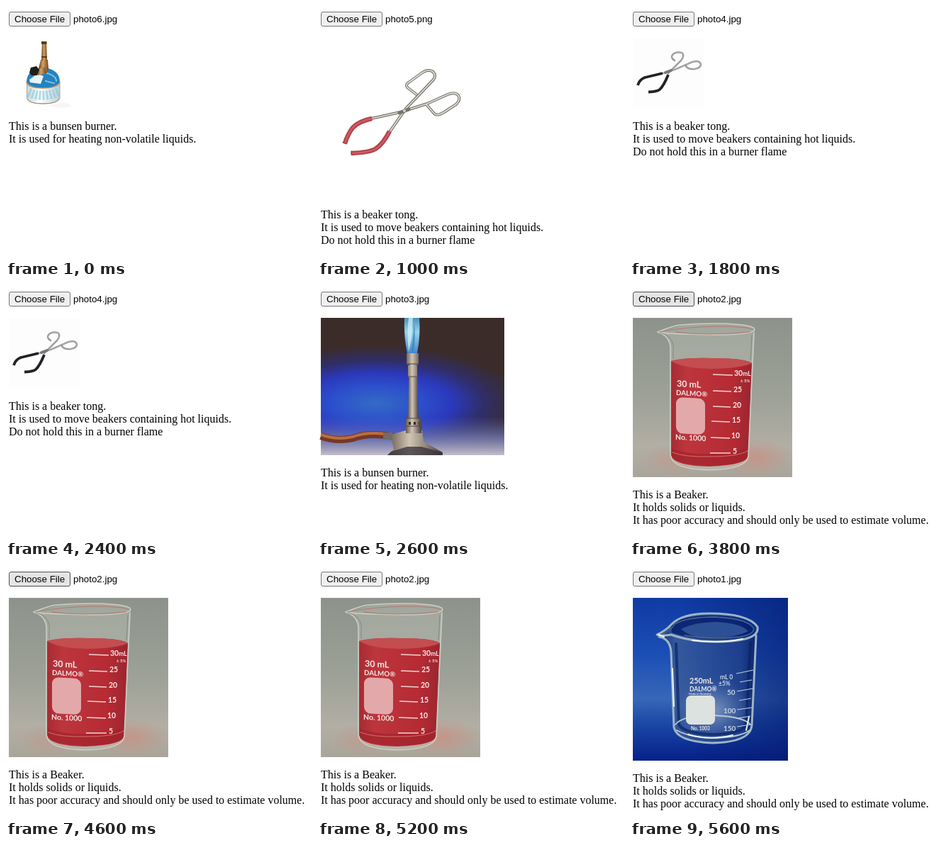
Recreate the animation shown at these times as an HTML page. Size 432 px wide and 356 px high, loop 7.4 s.

```html
<!DOCTYPE html>
<html lang="en">
<head>
<meta charset="utf-8">
<title>Lab equipment classifier</title>
<style>
  html, body { margin: 0; width: 100%; height: 100%; overflow: hidden; background: #fff; color: #000; }
  svg, #button, #file, #caption { position: absolute; left: 4px; top: 0; white-space: pre; }
  svg { left: 0; }
  #button, #file { top: 8px; font: 13.3333px "Liberation Sans", Arial, sans-serif; }
  #button { box-sizing: border-box; width: 87px; height: 21px; padding: 2px 7px; border: 1px solid #767676; border-radius: 3px; background: #efefef; }
  #button.hover { border-color: #4f4f4f; background: #e5e5e5; }
  #file { left: 95px; padding-top: 3px; }
  #caption { font: 16px "Liberation Serif", "Times New Roman", serif; }
  .scene { display: none; }
  .scene.on { display: inline; }
  .line { fill: none; stroke-linecap: round; stroke-linejoin: round; }
  .print { font-family: Lato, "Open Sans", sans-serif; font-weight: bold; fill: #f6e9e8; }
</style>
</head>
<body>
<div id="button">Choose File</div>
<div id="file"></div>
<svg width="432" height="356" viewBox="0 0 432 356">
  <defs>
    <linearGradient id="brass"><stop stop-color="#694019"/><stop offset=".45" stop-color="#d2a164"/><stop offset="1" stop-color="#70451d"/></linearGradient>
    <linearGradient id="steel"><stop stop-color="#64594f"/><stop offset=".4" stop-color="#d0c5b4"/><stop offset=".65" stop-color="#9c8f83"/><stop offset="1" stop-color="#483d3c"/></linearGradient>
    <linearGradient id="can"><stop stop-color="#c9d7da"/><stop offset=".4" stop-color="#fff"/><stop offset="1" stop-color="#b9ced5"/></linearGradient>
    <radialGradient id="glow" gradientUnits="userSpaceOnUse" cx="0" cy="0" r="1" gradientTransform="translate(82 166) scale(205 82)">
      <stop stop-color="#346bc4"/><stop offset=".3" stop-color="#2c50cc"/><stop offset=".52" stop-color="#2b39bd"/><stop offset=".74" stop-color="#302e68"/><stop offset="1" stop-color="#3b2c29"/>
    </radialGradient>
    <linearGradient id="bench" x2="0" y2="1"><stop stop-color="#5364bf" stop-opacity="0"/><stop offset=".55" stop-color="#7880bb" stop-opacity=".75"/><stop offset="1" stop-color="#c5bfca"/></linearGradient>
    <linearGradient id="flame" x2="0" y2="1"><stop stop-color="#4a91bf"/><stop offset=".4" stop-color="#99d5e9"/><stop offset="1" stop-color="#4387cc"/></linearGradient>
    <linearGradient id="wall" x2="0" y2="1"><stop stop-color="#8d938b"/><stop offset=".5" stop-color="#9da197"/><stop offset=".8" stop-color="#b2aea4"/><stop offset="1" stop-color="#aaa59a"/></linearGradient>
    <linearGradient id="liquid"><stop stop-color="#a92b33"/><stop offset=".2" stop-color="#bd363d"/><stop offset=".75" stop-color="#b62a33"/><stop offset="1" stop-color="#9a2630"/></linearGradient>
    <radialGradient id="blush"><stop stop-color="#cf8a7c" stop-opacity=".65"/><stop offset="1" stop-color="#cf8a7c" stop-opacity="0"/></radialGradient>
    <linearGradient id="blue" x2="0" y2="1"><stop stop-color="#0f3aa4"/><stop offset=".35" stop-color="#1b4fb6"/><stop offset=".62" stop-color="#3767b8"/><stop offset=".78" stop-color="#1a46a6"/><stop offset="1" stop-color="#06208a"/></linearGradient>
    <linearGradient id="dusk"><stop offset=".3" stop-color="#041a6c" stop-opacity="0"/><stop offset="1" stop-color="#041a6c" stop-opacity=".6"/></linearGradient>
    <linearGradient id="glass"><stop stop-color="#0b2467"/><stop offset=".18" stop-color="#3c5c97"/><stop offset=".5" stop-color="#2c4f95"/><stop offset=".85" stop-color="#203f88"/><stop offset="1" stop-color="#0a2163"/></linearGradient>
    <radialGradient id="shine"><stop stop-color="#bccbdc" stop-opacity=".85"/><stop offset="1" stop-color="#8ca9d2" stop-opacity="0"/></radialGradient>
  </defs>

  <!-- Gas canister burner -->
  <g class="scene">
    <path d="M70 138Q84 134 92 141Q78 147 62 141Z" fill="#f6f5f4"/>
    <path d="M29.500 108V130Q31 138 52 138Q74 138 76 130V108Z" fill="url(#can)" stroke="#a6a7a3"/>
    <path d="M32 122Q52 131 74 121" class="line" stroke="#88c8df" stroke-width="13" stroke-dasharray="3 2" style="stroke-linecap:butt" opacity=".65"/>
    <path d="M30 131Q32 138 52 138Q73 138 75 131" class="line" stroke="#a58b68"/>
    <path d="M29 108Q29 91 48 88H59Q76 92 76 108Q68 116 52 116Q36 116 29 108Z" fill="#2482bf"/>
    <path d="M33 104L44 96L53 99L49 110L34 108Z" fill="#e9f3f5"/>
    <path d="M58 95Q71 99 71 106M56 106L68 109" class="line" stroke="#87c7e4" stroke-width="2" stroke-dasharray="2 2"/>
    <path d="M29 108Q32 116 52 116Q72 116 76 108" class="line" stroke="#c28a55" stroke-width="1.500"/>
    <path d="M49 76H59L60 89L57 96H49L46 88Z" fill="url(#brass)"/>
    <path d="M51 50H57L58 77H50Z" fill="url(#brass)"/>
    <path d="M50 50H57.500V54H50ZM50 71H58V73H50Z" fill="#5d3c1c"/>
    <path d="M43 90L55 86L57 95L45 98Z" fill="url(#brass)"/>
    <path d="M35 87L43 85L47 90L44 98L36 98L33 94Z" fill="#211d1a"/>
  </g>

  <!-- Red handled tongs -->
  <g class="scene">
    <g class="line">
      <g stroke="#77746c" stroke-width="4">
        <path id="upperArm" d="M139 125L126 115Q123 111 128 108L146 95Q154 89 161 92Q168 97 163 104L124 145L101 178"/>
        <path id="lowerArm" d="M153 139L164 152Q168 156 178 150L195 139Q202 132 198 126Q193 121 183 125L154 138L116 150L75 159"/>
      </g>
      <g stroke="#e3e1da" stroke-width="1.700"><use href="#upperArm"/><use href="#lowerArm"/></g>
      <path d="M115 151L128 146" stroke="#77746c" stroke-width="5"/>
      <circle cx="122" cy="148" r="2" fill="#d6d3ca"/>
      <g stroke="#b5434b" stroke-width="6.500" style="stroke-linecap:butt">
        <path id="gripA" d="M76 159Q57 163 49 172Q42 181 38 194"/>
        <path id="gripB" d="M101 177Q92 195 81 202Q72 207 47 208"/>
      </g>
      <g stroke="#d3656b" stroke-width="2" stroke-dasharray="1 2"><use href="#gripA"/><use href="#gripB"/></g>
      <path d="M35 193L40 195M47 205V210" stroke="#772f34"/>
    </g>
  </g>

  <!-- Black handled tongs -->
  <g class="scene">
    <path d="M4 45H104V145H4Z" fill="#fcfdfc"/>
    <g class="line">
      <g stroke="#777" stroke-width="2.200">
        <path id="smallUpper" d="M63 77Q57 73 60 69Q65 64 73 66Q78 70 72 77L54 95"/>
        <path id="smallLower" d="M79 85Q83 90 91 89Q99 88 100 83Q99 76 88 79L63 90L46 95"/>
      </g>
      <g stroke="#d5d5d5" stroke-width=".8"><use href="#smallUpper"/><use href="#smallLower"/></g>
      <path d="M50 94L58 91" stroke="#777" stroke-width="4"/>
      <path d="M46 95L21 101Q13 104 11 112M54 97Q48 112 42 118Q38 121 26 121.500" stroke="#222126" stroke-width="3.800" style="stroke-linecap:butt"/>
    </g>
  </g>

  <!-- Lit burner -->
  <g class="scene">
    <path d="M4 45H263V239H4Z" fill="url(#glow)"/>
    <path d="M4 184H263V239H4Z" fill="url(#bench)"/>
    <path d="M122 45H143Q145 68 140 95H126Q121 72 122 45Z" fill="url(#flame)"/>
    <path d="M128 45H134L132 75L128 93Q125 66 128 45Z" fill="#d9f4f9" opacity=".7"/>
    <path d="M136 51Q138 72 135 91L132 94Z" fill="#367fb8" opacity=".7"/>
    <path d="M4 212Q26 220 49 215Q72 206 108 213" class="line" stroke="#753826" stroke-width="10" style="stroke-linecap:butt"/>
    <path d="M4 210Q26 218 49 213Q72 204 108 211" class="line" stroke="#b96d42" stroke-width="4" style="stroke-linecap:butt"/>
    <path d="M92 207H105V217H92Z" fill="#756a68"/>
    <path d="M103 210L124 204H147L149 220L176 235V239H98L107 231Z" fill="url(#steel)"/>
    <path d="M103 234L126 227H146L175 235V239H98Z" fill="#363039" opacity=".75"/>
    <path d="M129 111H140L142 190H127Z" fill="url(#steel)"/>
    <path d="M125 95H142V111H125ZM127 112H140V129H127ZM124 187H146V208H124Z" fill="url(#steel)"/>
    <path d="M125 110H142M127 128H140M124 187H146M124 198H146" stroke="#4e4542"/>
    <path d="M128 194H143" stroke="#322c2c" stroke-width="4" stroke-dasharray="3 4"/>
  </g>

  <!-- Red liquid beaker -->
  <g class="scene">
    <path d="M4 45H229V270H4Z" fill="url(#wall)"/>
    <ellipse cx="176" cy="242" rx="53" ry="27" fill="url(#blush)"/>
    <ellipse cx="62" cy="246" rx="46" ry="22" fill="url(#blush)" opacity=".6"/>
    <path d="M39 65Q56 68 57 86V239Q59 259 112 260Q166 259 168 240L176 63Q174 53 118 54Q72 54 60 60Z" fill="#c7c8bd" opacity=".35"/>
    <path d="M58 106Q75 101 117 102Q162 102 172 109L167 240Q165 253 112 255Q61 254 58 239Z" fill="url(#liquid)"/>
    <path d="M58 106Q75 101 117 102Q162 102 172 109Q158 116 115 117Q73 116 58 106Z" fill="#c44d50"/>
    <path d="M59 229Q77 238 112 237Q153 237 167 227L166 242Q158 253 112 254Q64 253 59 239Z" fill="#a0232c" opacity=".65"/>
    <path d="M60 235Q77 242 112 241Q153 241 166 233" class="line" stroke="#d9706a"/>
    <g class="line" stroke="#cdd0c6" stroke-width="1.500">
      <path d="M39 65Q56 70 57 87V239Q59 259 112 260Q165 259 167 240L175 66"/>
      <path d="M39 65Q51 60 65 56Q84 53 125 53Q177 54 176 62Q172 69 122 69Q73 68 55 67Z"/>
    </g>
    <path d="M43 66Q58 70 61 83V103M172 69L170 104" class="line" stroke="#838980"/>
    <path d="M41 65Q75 58 123 57Q162 57 173 61M64 65Q106 71 169 65" class="line" stroke="#b3766d"/>
    <g class="print" transform="translate(65 157) skewY(3) translate(-65 -157)">
      <text x="66" y="142" font-size="12.500">30 mL</text>
      <text x="65" y="154" font-size="9.800">DALMO®</text>
      <rect x="65" y="157" width="41" height="51" rx="9" fill="#e3a9aa"/>
      <text x="64" y="217" font-size="10.500">No. 1000</text>
    </g>
    <g class="print" font-size="10.500">
      <text x="147" y="127">30<tspan font-size="8.500">mL</tspan></text>
      <text x="156" y="136" font-size="6">± 5%</text>
      <text x="146" y="150">25</text><text x="145" y="172">20</text>
      <text x="144" y="193">15</text><text x="143" y="215">10</text><text x="145" y="237">5</text>
    </g>
    <path d="M117 125L145 126M117 148L143 149M117 170L142 171M115 191L141 192M114 214L141 215M113 236L142 236" stroke="#f0d5d2" stroke-width="1.300"/>
  </g>

  <!-- Empty beaker -->
  <g class="scene">
    <path d="M4 45H223V275H4Z" fill="url(#blue)"/>
    <path d="M4 45H223V275H4Z" fill="url(#dusk)"/>
    <path d="M39 98Q56 102 58 121L62 229Q64 248 116 250Q171 248 172 225L178 94Q169 69 111 68Q67 69 57 83Z" fill="url(#glass)" opacity=".8"/>
    <ellipse cx="119" cy="204" rx="53" ry="44" fill="url(#shine)" opacity=".65"/>
    <path d="M58 82Q73 70 115 70Q162 71 175 85Q174 98 149 102Q92 107 59 94Z" fill="#08206f" opacity=".85"/>
    <path d="M72 89Q92 79 122 79Q157 81 167 92Q144 104 99 101Q81 98 72 89Z" fill="#365b9e" opacity=".8"/>
    <g class="line">
      <path d="M65 110L69 224Q75 236 116 238Q158 237 164 224L170 108" stroke="#0b2464" stroke-width="4" opacity=".7"/>
      <g stroke="#9eb5c4" stroke-width="3">
        <path d="M41 100Q56 102 58 121L62 228Q66 248 116 250Q170 249 172 225L178 98"/>
        <path d="M38 97Q51 91 58 83Q73 67 112 67Q167 67 180 86Q182 98 163 103Q137 109 99 106Q74 103 58 97Q48 99 38 97Z"/>
      </g>
      <path d="M41 98Q58 92 63 82Q81 72 119 72Q165 74 174 87Q178 96 155 100Q116 105 77 98" stroke="#4e6c8b" stroke-width="1.300"/>
      <path d="M64 224Q76 210 119 211Q161 213 170 224M66 232Q83 242 119 243Q156 242 169 232" stroke="#b8c9d7" stroke-width="1.800"/>
      <path d="M40 97L48 100M60 145L62 198M168 213L164 232M82 238Q111 247 145 239M88 105Q126 110 159 103" stroke="#eef4ef" stroke-width="2"/>
    </g>
    <g class="print" font-size="10">
      <text x="84" y="166" font-size="10.800">250mL</text>
      <text x="84" y="177" font-size="8.500">DALMO®</text>
      <text x="83" y="182" font-size="4">Made in Germany</text>
      <rect x="79" y="183" width="41" height="41" rx="7" fill="#dce2df"/>
      <text x="86" y="232" font-size="6.500">No. 1003</text>
      <g fill="#c8d7e4">
        <text x="127" y="160" font-size="8.500">mL 0</text><text x="125" y="169" font-size="8.500">±5%</text>
        <text x="137" y="182">50</text><text x="132" y="208">100</text><text x="132" y="233">150</text>
      </g>
    </g>
    <path d="M150 152L174 147M155 164L172 161M151 177L174 173M154 190L171 187M151 203L172 200M153 215L170 212M151 227L171 224" stroke="#bcd0df" stroke-width="1.200"/>
  </g>
</svg>
<div id="caption"></div>
<script>
  const LOOP = 7400, GAP = 16;
  const burner = "This is a bunsen burner.\nIt is used for heating non-volatile liquids.";
  const tong = "This is a beaker tong.\nIt is used to move beakers containing hot liquids.\nDo not hold this in a burner flame";
  const beaker = "This is a Beaker.\nIt holds solids or liquids.\nIt has poor accuracy and should only be used to estimate volume.";
  const slides = [
    { at: 0, file: "photo6.jpg", bottom: 145, text: burner },
    { at: 1000, file: "photo5.png", bottom: 270, text: tong },
    { at: 1800, file: "photo4.jpg", bottom: 145, text: tong },
    { at: 2600, file: "photo3.jpg", bottom: 239, text: burner },
    { at: 3400, file: "photo2.jpg", bottom: 270, text: beaker },
    { at: 5600, file: "photo1.jpg", bottom: 275, text: beaker }
  ];
  const $ = id => document.getElementById(id);
  const scenes = document.querySelectorAll(".scene");
  let shown = -1;

  function show(index) {
    const { file, bottom, text } = slides[index];
    scenes.forEach((scene, i) => scene.classList.toggle("on", i === index));
    $("file").textContent = file;
    $("caption").textContent = text;
    $("caption").style.top = bottom + GAP + "px";
    shown = index;
  }

  function draw() {
    const t = performance.now() % LOOP;
    const index = slides.findLastIndex(slide => t >= slide.at);
    if (index !== shown) show(index);
    $("button").classList.toggle("hover", t >= 3800 && t < 5200);
    requestAnimationFrame(draw);
  }
  draw();
</script>
</body>
</html>
```
